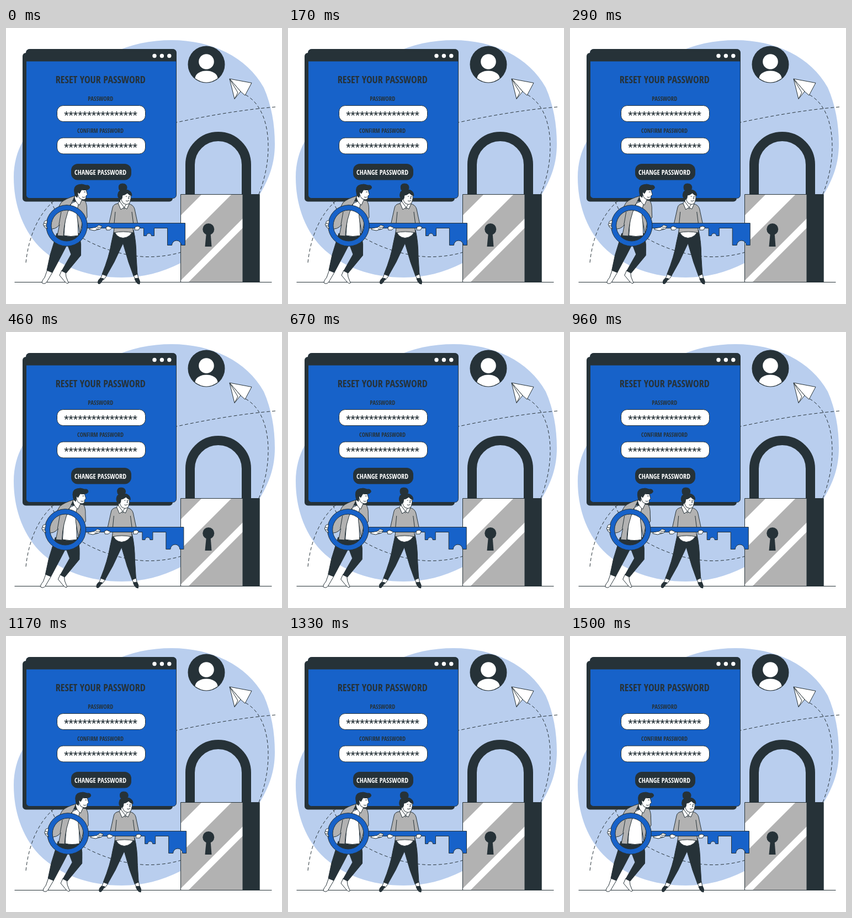
Animation of 500 by 500 pixels, one loop 1.54 s. Source, as an HTML page with a canvas:

```html
<!DOCTYPE html>
<html lang="en">
<head>
<meta charset="utf-8">
<title>Reset your password</title>
<style>
  html, body { margin: 0; width: 100%; height: 100%; overflow: hidden; background: #fff; }
  canvas { display: block; width: 500px; height: 500px; }
</style>
</head>
<body>
<canvas id="stage"></canvas>
<script>
const SIZE = 500, LOOP = 1540;
const BLUE = '#1762c9', PALE = '#b9ceee', DARK = '#263238', GREY = '#b2b2b2', WHITE = '#fff';
const canvas = document.getElementById('stage');
const ctx = canvas.getContext('2d');
const ratio = window.devicePixelRatio || 1;
canvas.width = canvas.height = SIZE * ratio;

function paint(path, fill, stroke = DARK, width = 1) {
  if (fill) { ctx.fillStyle = fill; ctx.fill(path, 'evenodd'); }
  if (stroke) {
    ctx.strokeStyle = stroke;
    ctx.lineWidth = width;
    ctx.stroke(path);
  }
}
const shape = (d, fill, stroke, width) => paint(new Path2D(d), fill, stroke, width);

function circle(x, y, r, fill, stroke = null) {
  const p = new Path2D();
  p.arc(x, y, r, 0, 2 * Math.PI);
  paint(p, fill, stroke);
}

function box(x, y, w, h, r, fill, stroke = null) {
  const p = new Path2D();
  p.roundRect(x, y, w, h, r);
  paint(p, fill, stroke);
}

function setFont(family, weight, size) {
  ctx.font = `${weight} ${size}px "${family}", Roboto, sans-serif`;
  ctx.fontStretch = 'extra-condensed';
}

// The lettering is condensed: take the face whose capitals are narrowest for their height.
function slimness(family) {
  setFont(family, 700, 100);
  const m = ctx.measureText('RESET YOUR PASSWORD');
  return m.width / m.actualBoundingBoxAscent;
}
const CAPS = ['Roboto', 'Roboto Condensed', 'Open Sans', 'Open Sans Condensed', 'Noto Sans',
  'Noto Sans ExtraCondensed', 'Liberation Sans Narrow', 'Lato']
  .reduce((best, family) => slimness(family) < slimness(best) ? family : best);

// Centres a line of text; its font size follows from the room it has.
function label(text, x, y, room, weight, color = DARK, family = CAPS) {
  setFont(family, weight, 100);
  setFont(family, weight, 100 * room / ctx.measureText(text).width);
  const m = ctx.measureText(text);
  ctx.textAlign = 'center';
  ctx.fillStyle = color;
  ctx.fillText(text, x, y + (m.actualBoundingBoxAscent - m.actualBoundingBoxDescent) / 2);
}

function drawBackdrop() {
  shape('M300 22C372 22 436 52 467 108C481 140 487 174 487 210C487 246 477 272 459 303L400 380C365 405 340 416 316 426C282 443 248 452 210 452C152 452 98 434 60 396C28 362 14 316 14 270C14 246 20 224 30 206C65 150 120 90 190 47C225 29 262 22 300 22Z', PALE, null);
  ctx.setLineDash([6, 4]);
  shape('M488 143C430 148 370 158 309 171', null);
  shape('M87 313C58 338 41 378 36 425', null);
  shape('M434 121C464 138 475 176 475 215C475 247 468 276 457 304M318 406C298 412 277 415 252 414.500C202 412 150 392 117 366C101 352 90 334 82 315', null);
  ctx.setLineDash([]);
}

function drawWindow() {
  box(30, 45, 272, 269.5, 6, DARK);
  box(36.5, 38.5, 272, 270, 6, BLUE, DARK);
  box(36.5, 38.5, 272, 22, [6, 6, 0, 0], DARK);
  for (const x of [269, 282.4, 295.8]) circle(x, 50.5, 3.7, WHITE);

  label('RESET YOUR PASSWORD', 171.3, 93.8, 163, 700);
  label('PASSWORD', 171.2, 127.8, 46, 400);
  label('CONFIRM PASSWORD', 171, 186.2, 84, 400);
  for (const y of [140.5, 199]) {
    box(92.5, y, 160, 29, 11, WHITE, DARK);
    label('*'.repeat(16), 171.5, y + 14, 132.5, 500, DARK, 'Roboto');
  }
  box(118, 246, 109, 29.5, 12, DARK);
  label('CHANGE PASSWORD', 171, 261, 94, 600, WHITE);
}

function drawAvatarAndPlane() {
  circle(363, 66, 33.5, DARK);
  circle(363, 61, 13.8, WHITE);
  shape('M342.5 91C344 73 382 73 383.5 91Q363 106 342.5 91Z', WHITE, null);
  shape('M405 92L445 99.5L433 122L425 115Z', WHITE);
  shape('M405 92L414 128.500L425 115Z', WHITE);
  shape('M405 92L420 117L414 128.500', null);
}

function drawLock() {
  shape('M333.5 302V247.5A51 51 0 0 1 435.5 247.5V302', null, DARK, 17);
  shape('M316.5 301.5H429V460.5H316.5Z', GREY, null);
  shape('M354.500 301.5H408.500L316.5 393.500V339.500Z', WHITE, null);
  shape('M429 345V362L330.500 460.5H316.5V457.5Z', WHITE, null);
  shape('M316.5 301.5H459V460.5H316.5Z', null);
  shape('M429 301.5H459V460.5H429Z', DARK);
  circle(366.8, 364.5, 10.5, DARK);
  shape('M363 370H370.5L372.5 396H360.5Z', DARK, null);
}

function drawMan() {
  // shoes
  shape('M75 438L70 452Q64 459 65.500 462Q70 465 74 460L84 443Z', WHITE);
  shape('M101 439L97 448L107 460Q113 465 113 461L109 451L108 443Z', WHITE);
  // trousers
  shape('M92 372L118 378L101 411L84 443L74 439L80 411Z', DARK);
  shape('M106 374L133 372Q137 392 135.500 412L109 444L101 440L118 410L109 386Z', DARK);
  // shirt and jacket
  shape('M109 322L133 311L130 344L131 376Q117 379 105 376Z', WHITE);
  shape('M125 304Q108 309 100 316Q91 331 86 343L75 349L75 364Q91 366 97 356L93 376L104 377Q105 347 117 321Z', GREY);
  shape('M132 311L143 313Q147 319 146.500 330L147 343L138 354L134 372L130 350Q127 335 131 320Z', GREY);
  shape('M100 333L96 356M117 319L113 328L122 322', null);
  // head
  shape('M126 299L124 307Q126 316 133 321L138 310Z', WHITE);
  shape('M130 290Q128 303 134 309Q141 313 144.500 309L145 304L147.500 302L145.500 295L144 290Z', WHITE);
  shape('M124.500 301Q121 286 131 284Q137 281.500 145 285Q152 284 151.500 290Q148 295 137 293L133 300L130 297L129 307Q125 305 124.500 301Z', DARK);
  shape('M141 297H144M138 306Q141 308 143 306', null);
}

function drawWoman() {
  // legs and shoes
  shape('M175 445L169 459L177 456L183 448ZM231 448L235 457L241 458L238 445Z', WHITE);
  shape('M171 453Q165 458 167 463Q171 465 174 458L177 454ZM233 454Q236 464 242 464Q244 459 240 453Z', DARK);
  shape('M196 366L191 389Q187 414 174 446L182 449L196 424L212 390L222 424L231 449L238 446L236 414Q236 387 231 366Z', DARK);
  shape('M196 365Q198 379 212 380.500Q227 379 230 365Z', WHITE);
  // sweater
  shape('M203 318Q194 319 193 326L187 353L185 361L196 362L195 371Q212 367 231 371L230 362L240 361L233 328Q231 320 221 318Z', GREY);
  shape('M198 333L196 354M228 333L231 356', null);
  // head
  shape('M207 307L206 318L214 328L221 318L219 312Z', WHITE);
  shape('M203 317L206 314L214 325L208 329ZM221 315L223 319L219 328L214 325Z', WHITE);
  shape('M208 298Q207 311 212 317Q219 322 224 317Q227 310 226.500 299Z', WHITE);
  shape('M207 311Q200 306 204 297Q209 290 219 293Q228 295 228 304Q223 303 220 299Q215 303 211 303L210 309Z', DARK);
  shape('M205 293Q202 282 211 282Q220 282 219 291L213 296Z', DARK);
  shape('M217 305H219M223 305H225M217 313Q220 315 223 312M222 305L223 309H221', null);
}

function drawKey() {
  shape('M146 353.500H324.500V393.500H317.500A8.500 8.500 0 0 0 300.500 393.500H292.500V362.500H268.500V376.500H263.500A4.500 4.500 0 0 0 254.500 376.500H249.500V362.500H146Z', BLUE);
  const ring = new Path2D();
  ring.arc(110, 358, 37.3, 0, 2 * Math.PI);
  ring.moveTo(138, 358);
  ring.arc(110, 358, 28, 0, 2 * Math.PI);
  paint(ring, BLUE);
}

function drawHands() {
  shape('M75 349Q69 348 69 353L67.500 356L70 361L75 364L73 358Z', WHITE);
  shape('M69 354L73 355M69 358L73 359', null);
  shape('M152 363L163 361L168 357L174 359L171 364L160 367L151 365Z', WHITE);
  shape('M165 361L172 361M163 364L169 364', null);
  shape('M185 359L181 361L182 366L188 366L192 362ZM234 360L233 366L240 366L243 361L239 359Z', WHITE);
}

// Cubic easing with control points (.36, .07) and (.19, .97).
function ease(x) {
  const curve = (a, b, s) => 3 * a * s * (1 - s) ** 2 + 3 * b * s * s * (1 - s) + s ** 3;
  let low = 0, high = 1;
  for (let i = 0; i < 20; i++) {
    const mid = (low + high) / 2;
    if (curve(0.36, 0.19, mid) < x) low = mid; else high = mid;
  }
  return curve(0.07, 0.97, low);
}

// Sideways shake: [time in ms, offset in px]
const SHAKE = [[0, 0], [135, -1], [277, 2], [427, -4], [605, 4], [755, -3.4], [901, 4],
  [1040, -3.5], [1165, 2.2], [1340, -1], [1500, 0], [LOOP, 0]];

function shakeAt(t) {
  const i = SHAKE.findIndex(([time]) => time > t);
  const [t0, x0] = SHAKE[i - 1], [t1, x1] = SHAKE[i];
  return x0 + (x1 - x0) * ease((t - t0) / (t1 - t0));
}

function draw(t) {
  ctx.setTransform(ratio, 0, 0, ratio, 0, 0);
  ctx.lineJoin = 'round';
  ctx.fillStyle = WHITE;
  ctx.fillRect(0, 0, SIZE, SIZE);
  drawBackdrop();
  drawWindow();
  drawAvatarAndPlane();
  drawLock();
  shape('M15.500 460.500H481.500', null);
  ctx.translate(shakeAt(t), 0);
  drawMan();
  drawWoman();
  drawKey();
  drawHands();
}

const start = performance.now();
function tick() {
  draw((performance.now() - start) % LOOP);
  requestAnimationFrame(tick);
}
tick();
</script>
</body>
</html>
```
